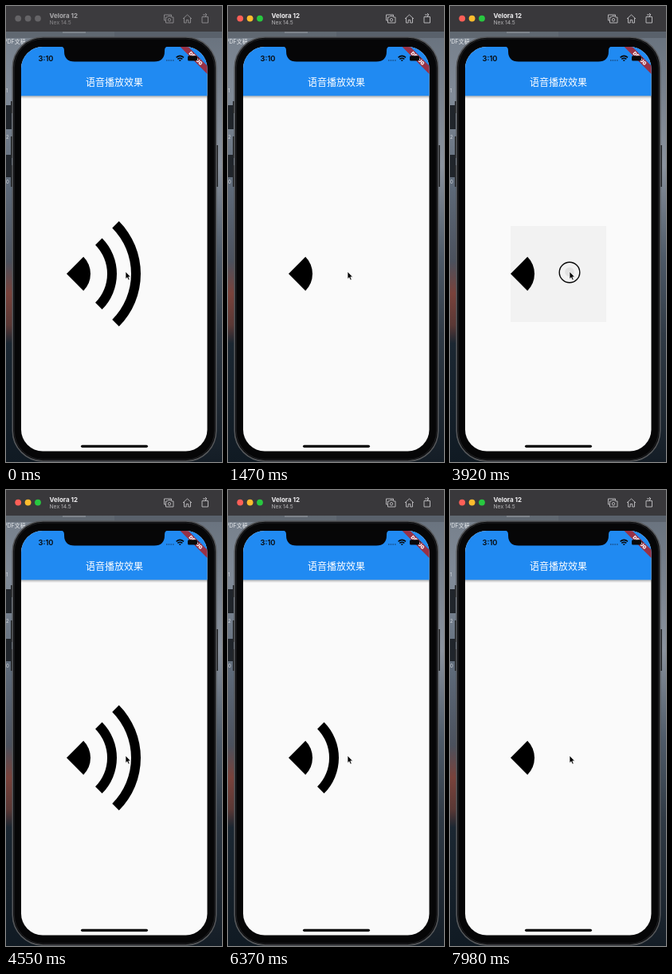
These frames come from a looping animation (271x570 px, 8 s). An HTML page:

```html
<!DOCTYPE html>
<html lang="zh">
<head>
<meta charset="utf-8">
<style>
  html, body { margin: 0; width: 100%; height: 100%; overflow: hidden; background: #20262e; }
  svg { display: block; width: 100vw; height: 100vh; }
  text { font-family: Inter, "Noto Sans CJK SC", "Noto Sans CJK", sans-serif; }
  .icon { fill: none; stroke: #b5b4b7; stroke-width: 1; stroke-linejoin: round; }
</style>
</head>
<body>
<svg viewBox="0 0 271 570">
  <defs>
    <linearGradient id="wall" x2="0" y2="1">
      <stop offset="0" stop-color="#737c87"/>
      <stop offset=".2" stop-color="#808a97"/>
      <stop offset=".4" stop-color="#5d6978"/>
      <stop offset=".56" stop-color="#4b515d"/>
      <stop offset=".63" stop-color="#79423b"/>
      <stop offset=".7" stop-color="#5a3835"/>
      <stop offset=".74" stop-color="#1b2732"/>
      <stop offset="1" stop-color="#101a23"/>
    </linearGradient>
    <linearGradient id="wallRight" x2="0" y2="1">
      <stop offset="0" stop-color="#626c78"/>
      <stop offset=".35" stop-color="#8a929d"/>
      <stop offset=".55" stop-color="#4e5a68"/>
      <stop offset=".72" stop-color="#303a45"/>
      <stop offset="1" stop-color="#141d26"/>
    </linearGradient>
    <linearGradient id="shade" x2="0" y2="1">
      <stop offset="0" stop-opacity=".3"/>
      <stop offset="1" stop-opacity="0"/>
    </linearGradient>
    <clipPath id="screen"><rect x="19" y="51" width="233.5" height="505.5" rx="27"/></clipPath>
    <clipPath id="button"><rect x="76" y="275" width="120" height="120"/></clipPath>
  </defs>

  <!-- Desktop -->
  <rect width="136" height="570" fill="url(#wall)"/>
  <rect x="136" width="135" height="570" fill="url(#wallRight)"/>
  <rect y="32" width="271" height="8" fill="#4a5159" opacity=".5"/>
  <path d="M71 33h29" stroke="#9aa0a6"/>
  <path d="M0 124h7v30H0zM0 186h7v28H0z" fill="#20252b"/>
  <text x="-3" y="47" font-size="7" fill="#e4e7ea">PDF文稿</text>
  <g font-size="6" fill="#d5d9de"><text x="0" y="108">1</text><text x="0" y="166">2</text><text x="0" y="222">0</text></g>

  <!-- Window bar -->
  <rect id="bar" width="271" height="32" fill="#39383b"/>
  <g id="lights">
    <circle cx="15.2" cy="15.6" r="3.9" fill="#ff5f57"/>
    <circle cx="27.6" cy="15.6" r="3.9" fill="#febc2e"/>
    <circle cx="40" cy="15.6" r="3.9" fill="#28c840"/>
  </g>
  <g id="grayLights" fill="#656467">
    <circle cx="15.2" cy="15.6" r="3.9"/><circle cx="27.6" cy="15.6" r="3.9"/><circle cx="40" cy="15.6" r="3.9"/>
  </g>
  <g id="barText">
    <text x="54.5" y="15" font-size="8" font-weight="700" fill="#f1f0f2">Velora 12</text>
    <text x="54.5" y="23.3" font-size="6.8" fill="#b5b4b7">Nex 14.5</text>
    <g class="icon">
      <path d="M200.5 18h-2v-7h9v2M200.5 14h2l1-1.3h3l1 1.3h2.500v7h-9.500z"/>
      <circle cx="205" cy="17.3" r="1.7"/>
      <path d="M222 16l5.500-5 5.500 5M223.500 15v6h2.700v-3.500h2.600v3.500h2.700v-6"/>
      <path d="M246 13.500h7.500v7.500H246zM247 11h4.500M250 9l2 2-2 2"/>
    </g>
  </g>

  <!-- Device -->
  <path d="M7 119v15M7 163v27M7 199v27M265 174v52" stroke="#25272a" stroke-width="2"/>
  <rect x="8.3" y="39" width="255.4" height="530" rx="38" fill="#060607" stroke="#55575a" stroke-width="1.6"/>
  <rect x="10.3" y="41" width="251.4" height="526" rx="36" fill="none" stroke="#202124"/>
  <g clip-path="url(#screen)">
    <rect x="19" y="51" width="234" height="506" fill="#fafafa"/>
    <rect x="19" y="112" width="234" height="4" fill="url(#shade)"/>
    <rect x="19" y="51" width="234" height="61.300" fill="#208af2"/>
    <text x="136" y="100.300" font-size="12" font-weight="500" fill="#fff" text-anchor="middle">语音播放效果</text>
    <g transform="translate(252.500 51) rotate(45)">
      <rect x="-24" y="16.800" width="48" height="7.200" fill="#b71c1c" fill-opacity=".8"/>
      <text y="22.600" font-size="6.100" font-weight="900" fill="#fff" text-anchor="middle">DEBUG</text>
    </g>
  </g>
  <path d="M68 50.500q5 0 5 5v1q0 13 13 13h100q13 0 13-13v-1q0-5 5-5z" fill="#060607"/>
  <text x="40.500" y="69" font-size="9.300" font-weight="600" fill="#080808">3:10</text>
  <path d="M201 68h10" stroke="#1a4f88" stroke-width="1.300" stroke-dasharray="1.500 1.200"/>
  <g fill="none" stroke="#080808" stroke-width="1.500">
    <path d="M213.600 64.400q4.700-4 9.400 0M215.300 66.400q3-2.400 6 0"/>
    <path d="M217.300 68h2"/>
  </g>
  <rect x="228" y="62.300" width="12" height="6.200" rx="1.600" fill="#080808"/>
  <path d="M241.300 64.300v2.200" stroke="#080808"/>
  <rect x="94" y="548.700" width="84" height="3.300" rx="1.650" fill="#050505"/>

  <!-- Voice button -->
  <g clip-path="url(#button)">
    <rect id="highlight" x="76" y="275" width="120" height="120" fill="#bcbcbc"/>
    <circle id="splash" cx="150" cy="332.500" fill="#c8c8c8"/>
  </g>
  <g id="voice"></g>

  <circle id="ring" cx="150" cy="333" r="12.800" fill="none" stroke="#080808" stroke-width="1.400"/>
  <path d="M150 332v9.300l2.100-1.900 1.400 3.200 1.700-.7-1.400-3.100h2.800z" fill="#050505" stroke="#fff" stroke-width=".7"/>
</svg>
<script>
const LOOP = 8000, STEP = 70, CYCLE = 1085;
const FOCUS = 140;
const plays = [{ from: 344, to: 3990 }, { from: 5670, to: LOOP }];
// Press: pointer ring interval, ink start, ink release.
const presses = [
  { ringOn: 90, ringOff: 270, down: 150, up: 300 },
  { ringOn: 3750, ringOff: 3970, down: 3850, up: 3980 },
  { ringOn: 5290, ringOff: 5500, down: 5395, up: 5590 },
];
const $ = id => document.getElementById(id);
const clamp = x => Math.min(1, Math.max(0, x));
const show = (el, on) => { el.style.visibility = on ? 'visible' : 'hidden'; };

function sector(inner, outer) {
  const at = (r, sign) => `${76 + r * Math.SQRT1_2} ${334.800 + sign * r * Math.SQRT1_2}`;
  const path = document.createElementNS('http://www.w3.org/2000/svg', 'path');
  path.setAttribute('d', `M${at(inner, -1)}L${at(outer, -1)}A${outer} ${outer} 0 0 1 ${at(outer, 1)}` +
    `L${at(inner, 1)}A${inner} ${inner} 0 0 0 ${at(inner, -1)}Z`);
  $('voice').append(path);
  return path;
}
const waves = [sector(0, 30), sector(51, 63), sector(81, 93)];

function waveCount(t) {
  const play = plays.find(p => t >= p.from && t < p.to);
  return play ? 1 + Math.floor((t - play.from) % CYCLE / CYCLE * 3) : 3;
}

function drawInk(t) {
  const press = presses.find(p => t >= p.down && t < p.up + 220);
  show($('highlight'), press);
  show($('splash'), press);
  if (!press) return;
  const held = Math.min(t, press.up) - press.down;
  const released = Math.max(0, t - press.up);
  const fade = 1 - clamp(released / 210);
  $('highlight').style.opacity = .4 * clamp(held / 210) * fade;
  $('splash').style.opacity = .4 * fade;
  $('splash').setAttribute('r', Math.min(85, held * .082 + released * .58));
}

function draw(t) {
  const focused = t >= FOCUS;
  show($('lights'), focused);
  show($('grayLights'), !focused);
  $('barText').style.opacity = focused ? 1 : .62;
  $('bar').setAttribute('fill', focused ? '#39383b' : '#3c3b3e');
  const count = waveCount(t);
  waves.forEach((wave, i) => show(wave, i < count));
  drawInk(t);
  show($('ring'), presses.some(p => t >= p.ringOn && t < p.ringOff));
}

const start = performance.now();
function tick() {
  const t = (performance.now() - start) % LOOP;
  draw(Math.floor(t / STEP) * STEP);
  requestAnimationFrame(tick);
}
tick();
</script>
</body>
</html>
```
